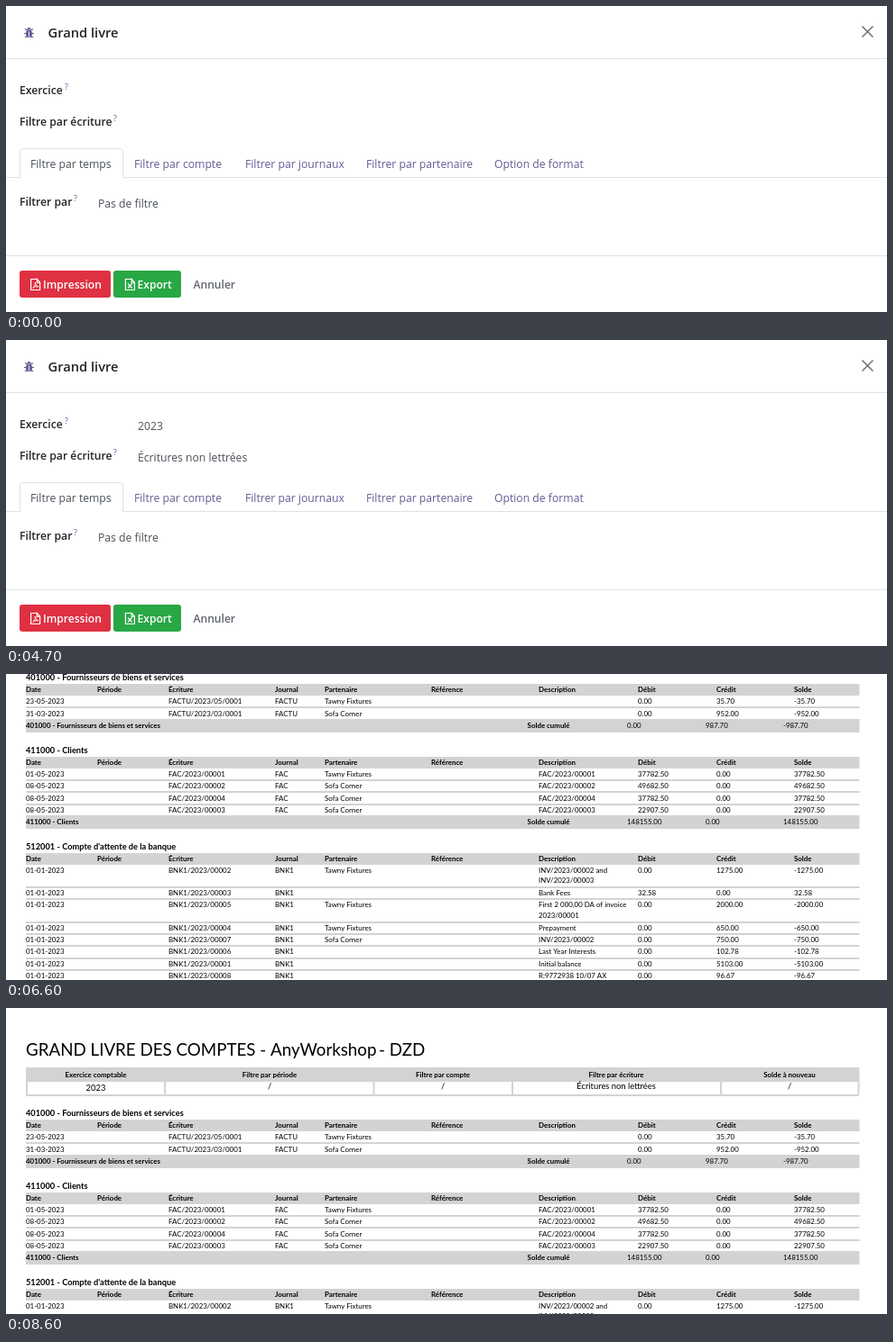
Write an HTML page with a canvas that moves like this. It is 976x340 px and loops after 9.6 s.

```html
<!DOCTYPE html>
<html lang="fr">
<head>
<meta charset="utf-8">
<title>Grand livre</title>
<style>
  html, body { margin: 0; width: 100%; height: 100%; overflow: hidden; background: #fff; }
  canvas { display: block; width: 976px; height: 340px; }
</style>
</head>
<body>
<canvas id="stage"></canvas>
<script>
const W = 976, H = 340, LOOP = 9600;
const SCROLL = 156, PAGE_END = 467;
const UI = '"Open Sans", "Noto Sans", sans-serif';
const REPORT = 'Lato, "Open Sans", sans-serif';
const PURPLE = '#665a94', GREY = '#d3d3d3', LINE = '#dee2e6', INK = '#212529', BODY = '#495057';

const ratio = window.devicePixelRatio || 1;

function setup(canvas) {
  canvas.width = Math.round(W * ratio);
  canvas.height = Math.round(H * ratio);
  const ctx = canvas.getContext('2d');
  ctx.scale(ratio, ratio);
  return ctx;
}

const stage = setup(document.getElementById('stage'));
const layerCanvas = document.createElement('canvas');
const layer = setup(layerCanvas);
let g = stage;

// ---------- helpers ----------
function rect(x, y, w, h, color) {
  g.fillStyle = color;
  g.fillRect(x, y, w, h);
}

// Baselines sit on whole pixels to stay crisp.
function text(s, x, y, font, color, align = 'left') {
  g.font = font;
  g.fillStyle = color;
  g.textAlign = align;
  g.fillText(s, x, Math.round(y));
}

const ui = (s, x, y, color = BODY, weight = 400, size = 12.2) =>
  text(s, x, y, `${weight} ${size}px ${UI}`, color);

const small = (s, x, y, weight = 400, align = 'left') =>
  text(s, x, y + 2.8, `${weight} 7.9px ${REPORT}`, '#000', align);

function path(points, color, width) {
  g.strokeStyle = color;
  g.lineWidth = width;
  g.beginPath();
  points.forEach(([x, y], i) => i ? g.lineTo(x, y) : g.moveTo(x, y));
  g.stroke();
}

function roundBox(x, y, w, h, r, color) {
  g.fillStyle = color;
  g.beginPath();
  g.roundRect(x, y, w, h, r);
  g.fill();
}

// Paint a group, then lay it over the stage with one opacity.
function group(alpha, paint) {
  if (alpha <= 0) return;
  layer.clearRect(0, 0, W, H);
  g = layer;
  paint();
  g = stage;
  g.globalAlpha = alpha;
  g.drawImage(layerCanvas, 0, 0, W, H);
  g.globalAlpha = 1;
}

// Number of 100 ms steps done, as a fraction.
const steps = (t, start, n) =>
  Math.min(n, Math.max(0, Math.floor((t - start) / 100) + 1)) / n;

const blinkedOff = (t, start) =>
  t >= start && t < start + 600 && Math.floor((t - start) / 200) % 2 === 0;

// ---------- dialog ----------
function bug(x, y) {
  for (const side of [-1, 1]) {
    path([[x, y + 1], [x + side * 5.5, y + 1]], PURPLE, 1.1);
    path([[x, y - 1], [x + side * 4.5, y - 4]], PURPLE, 1.1);
    path([[x, y + 3], [x + side * 4.5, y + 5.5]], PURPLE, 1.1);
  }
  g.fillStyle = PURPLE;
  g.beginPath();
  g.arc(x, y - 3, 2.4, Math.PI, 0);
  g.fill();
  roundBox(x - 3.4, y - 2.4, 6.8, 8, 3, PURPLE);
  path([[x, y - 1], [x, y + 5]], '#fff', 0.9);
}

function fileIcon(x, y) {
  path([[x + 7, y], [x, y], [x, y + 12], [x + 10, y + 12], [x + 10, y + 3.5],
    [x + 6.8, y], [x + 6.8, y + 3.8], [x + 10, y + 3.8]], '#fff', 1.2);
}

function buttons() {
  roundBox(15, 294, 101, 30, 3, '#df3142');
  fileIcon(27.6, 303.5);
  path([[30, 313.5], [32.3, 309.8], [32.3, 307], [33, 309.8], [36, 312], [32, 311.6], [30, 313.5]], '#fff', 0.9);
  ui('Impression', 41, 314, '#fff', 600, 12.1);

  roundBox(119, 294, 75, 30, 3, '#28a745');
  fileIcon(132.4, 303.5);
  path([[135, 308.5], [139.5, 313.5]], '#fff', 1.2);
  path([[139.5, 308.5], [135, 313.5]], '#fff', 1.2);
  ui('Export', 145.5, 314, '#fff', 600, 12.1);

  ui('Annuler', 207.5, 314, '#5f636f', 600, 12.1);
}

function label(s, x, y, helpX) {
  ui(s, x, y, INK, 600);
  ui('?', helpX, y - 4.6, PURPLE, 400, 8.8);
}

function tabs() {
  rect(0, 190, W, 1, LINE);
  g.beginPath();
  g.moveTo(15.5, 191);
  g.lineTo(15.5, 162);
  g.arcTo(15.5, 158.5, 19, 158.5, 3.5);
  g.lineTo(126, 158.5);
  g.arcTo(129.5, 158.5, 129.5, 162, 3.5);
  g.lineTo(129.5, 191);
  g.fillStyle = '#fff';
  g.fill();
  g.strokeStyle = LINE;
  g.lineWidth = 1;
  g.stroke();
  ui('Filtre par temps', 27, 180);
  ui('Filtre par compte', 142, 180, PURPLE);
  ui('Filtrer par journaux', 265, 180, PURPLE);
  ui('Filtrer par partenaire', 399, 180, PURPLE);
  ui('Option de format', 541, 180, PURPLE);
}

function menu() {
  rect(141, 128, 375, 57, '#767676');
  rect(142, 129, 373, 55, '#fff');
  rect(142, 166, 373, 18, '#1e73d8');
  ui('Toutes les écritures', 146, 142);
  ui('Écritures lettrées', 146, 161);
  ui('Écritures non lettrées', 146, 179, '#fff');
}

function dialog(t) {
  bug(25.5, 29.5);
  ui('Grand livre', 46.5, 35, INK, 600, 14.7);
  path([[948.5, 22.5], [960.5, 34.5]], '#6c6c6c', 1.5);
  path([[960.5, 22.5], [948.5, 34.5]], '#6c6c6c', 1.5);
  rect(0, 58, W, 1, LINE);

  if (!blinkedOff(t, 1000)) label('Exercice', 15, 98, 65);
  if (!blinkedOff(t, 2500)) label('Filtre par écriture', 15, 133, 119);
  tabs();
  label('Filtrer par', 15, 222, 75);
  ui('Pas de filtre', 102, 224);
  rect(0, 277, W, 1, LINE);
  buttons();

  group(steps(t, 1800, 3), () => ui('2023', 146, 100));
  const chosen = steps(t, 4500, 3);
  group(steps(t, 3300, 3) * (1 - chosen), menu);
  group(chosen, () => ui('Écritures non lettrées', 146, 135));
}

// ---------- report ----------
const COLS = [22, 101, 180, 298, 353, 471, 590, 700, 787, 873];
const HEADS = ['Date', 'Période', 'Écriture', 'Journal', 'Partenaire', 'Référence',
  'Description', 'Débit', 'Crédit', 'Solde'];
const SHOP = 'Tawny Fixtures', STORE = 'Sofa Corner';

const entry = (date, ref, partner, note, debit, credit, balance) =>
  [date, '', ref, ref.split('/')[0], partner, '', note, debit, credit, balance];
const sale = (date, n, partner, sum) =>
  entry(date, 'FAC/2023/0000' + n, partner, 'FAC/2023/0000' + n, sum, '0.00', sum);
const bank = (n, partner, note, credit) =>
  entry('01-01-2023', 'BNK1/2023/0000' + n, partner, note, '0.00', credit, '-' + credit);

const SECTIONS = [
  { y: 117, name: '401000 - Fournisseurs de biens et services', total: ['0.00', '987.70', '-987.70'], rows: [
    entry('23-05-2023', 'FACTU/2023/05/0001', SHOP, '', '0.00', '35.70', '-35.70'),
    entry('31-03-2023', 'FACTU/2023/03/0001', STORE, '', '0.00', '952.00', '-952.00')
  ] },
  { y: 197.7, name: '411000 - Clients', total: ['148155.00', '0.00', '148155.00'], rows: [
    sale('01-05-2023', 1, SHOP, '37782.50'),
    sale('08-05-2023', 2, STORE, '49682.50'),
    sale('08-05-2023', 4, STORE, '37782.50'),
    sale('08-05-2023', 3, STORE, '22907.50')
  ] },
  { y: 304.5, name: "512001 - Compte d'attente de la banque", rows: [
    bank(2, SHOP, 'INV/2023/00002 and\nINV/2023/00003', '1275.00'),
    entry('01-01-2023', 'BNK1/2023/00003', '', 'Bank Fees', '32.58', '0.00', '32.58'),
    bank(5, SHOP, 'First 2 000,00 DA of invoice\n2023/00001', '2000.00'),
    bank(4, SHOP, 'Prepayment', '650.00'),
    bank(7, STORE, 'INV/2023/00002', '750.00'),
    bank(6, '', 'Last Year Interests', '102.78'),
    bank(1, '', 'Initial balance', '5103.00'),
    bank(8, '', 'R:9772938 10/07 AX\n9415116318 T:5 BRT: 100,00', '96.67')
  ] }
];

function section({ y, name, total, rows }) {
  text(name, 22, y + 3.4, `700 9.25px ${REPORT}`, '#000');
  rect(22, Math.round(y + 7), 923.5, 13, GREY);
  HEADS.forEach((h, i) => small(h, COLS[i], y + 13.3, 700));

  let mid = y + 26.4;
  rows.forEach((row, r) => {
    const last = r === rows.length - 1;
    const tall = row[6].includes('\n');
    row.forEach((cell, i) =>
      cell.split('\n').forEach((part, k) => small(part, COLS[i], mid + k * 11.7)));
    mid += tall ? 25.4 : 13.3;
    if (!last) rect(22, Math.round(mid - 7.4), 923.5, 2, GREY);
  });

  if (total) {
    rect(22, Math.round(mid - 7.2), 923.5, 15, GREY);
    small(name, 22, mid, 700);
    small('Solde cumulé', 577.6, mid, 700);
    total.forEach((sum, i) => small(sum, [688, 775, 861][i], mid));
  }
}

function criteria(hidden) {
  rect(22, 66, 923.5, 16, GREY);
  rect(22, 96, 923, 2, GREY);
  for (const x of [22, 175, 406.5, 560, 791, 943.5]) rect(x, 82, 2, 14, GREY);
  const cells = [
    ['Exercice comptable', '2023', 99.5],
    ['Filtre par période', '/', 292],
    ['Filtre par compte', '/', 484],
    ['Filtre par écriture', 'Écritures non lettrées', 676],
    ['Solde à nouveau', '/', 868]
  ];
  cells.forEach(([head, value, x], i) => {
    small(head, x, 74.5, 700, 'center');
    if (hidden && value !== '/') return;
    text(value, x, i ? 90.4 : 92, `400 9.4px ${REPORT}`, '#000', 'center');
  });
}

function report(offset, hidden) {
  g.save();
  g.translate(0, offset);
  g.beginPath();
  g.rect(0, 0, W, PAGE_END);
  g.clip();
  rect(0, 0, W, PAGE_END, '#fff');
  const big = `400 18.75px ${REPORT}`;
  text('GRAND LIVRE DES COMPTES - AnyWorkshop', 22, 53, big, '#000');
  text('- DZD', 413, 53, big, '#000');
  criteria(hidden);
  SECTIONS.forEach(section);
  g.restore();
}

// ---------- timeline ----------
function pageOffset(t) {
  if (t < 6600) return -SCROLL;
  const k = Math.min(4, Math.floor((t - 6600) / 100));
  return Math.round(-113 + k * 28.25);
}

function draw(t) {
  g = stage;
  rect(0, 0, W, H, '#fff');
  const shown = steps(t, 5700, 5);
  if (shown < 1) dialog(t);
  group(shown, () => report(pageOffset(t), blinkedOff(t, 8000)));
}

const start = performance.now();
function frame() {
  draw((performance.now() - start) % LOOP);
  requestAnimationFrame(frame);
}
frame();
</script>
</body>
</html>
```
